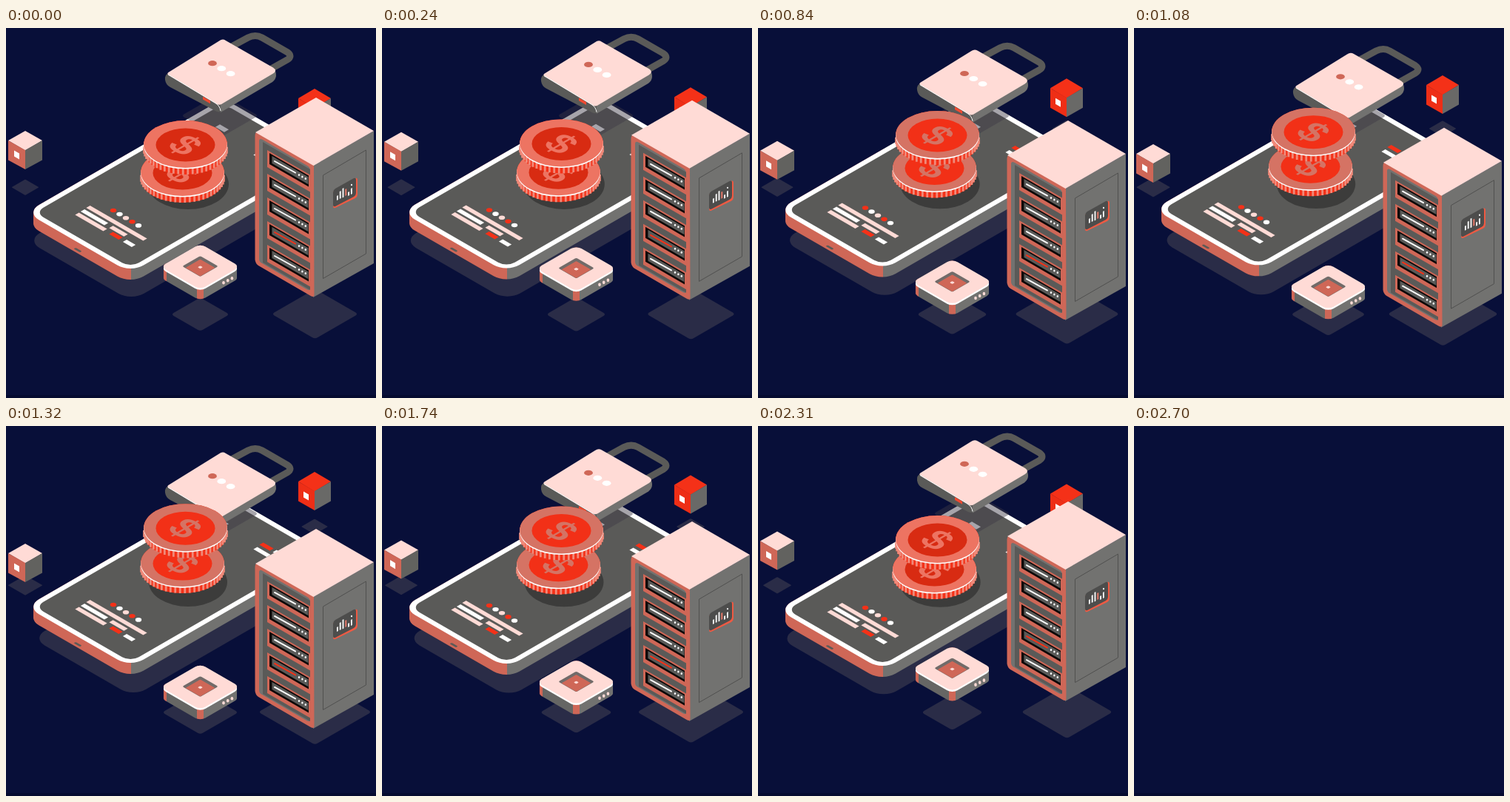
An HTML page with a canvas for the animation above (2.73 s loop, 500x500 px).

```html
<!DOCTYPE html>
<html lang="en">
<head>
<meta charset="utf-8">
<title>Isometric devices</title>
<style>
html, body { margin: 0; width: 100%; height: 100%; overflow: hidden; background: #080f39; }
canvas { display: block; }
</style>
</head>
<body>
<canvas id="stage" width="500" height="500"></canvas>
<script>
const ctx = document.getElementById('stage').getContext('2d');
const LOOP = 2730, STEP = 30;
const BG = '#080f39', PINK = '#ffdbd6', WHITE = '#ffffff', CORAL = '#cf6757', RED = '#f43118',
      DARK = '#5a5a58', GREY = '#727270', SHADOW = '#2a2c47';
const COS = Math.sqrt(3) / 2, SLOPE = 1 / Math.sqrt(3);

// Rounded rectangle lying on the isometric ground plane, a runs down-right, b runs up-right.
function isoRect(cx, cy, a, b, r) {
  const flat = new Path2D();
  flat.roundRect(-a / 2, -b / 2, a, b, r);
  const path = new Path2D();
  path.addPath(flat, new DOMMatrix([COS, 0.5, COS, -0.5, cx, cy]));
  return path;
}

function fill(path, color) {
  ctx.fillStyle = color;
  ctx.fill(path);
}

function poly(color, ...pts) {
  ctx.beginPath();
  for (let i = 0; i < pts.length; i += 2) ctx.lineTo(pts[i], pts[i + 1]);
  ctx.closePath();
  ctx.fillStyle = color;
  ctx.fill();
}

// Vertical wall panel: its top edge runs with the given slope.
function panel(color, x, y, w, h, slope = SLOPE) {
  poly(color, x, y, x + w, y + w * slope, x + w, y + w * slope + h, x, y + h);
}

function ellipse(color, x, y, rx, ry) {
  ctx.beginPath();
  ctx.ellipse(x, y, rx, ry, 0, 0, Math.PI * 2);
  ctx.fillStyle = color;
  ctx.fill();
}

// Square ground shadow with the given half width.
function diamond(x, y, hw, r = 4) {
  const side = (hw + 0.507 * r) / COS;
  fill(isoRect(x, y, side, side, r), SHADOW);
}

function shifted(dx, dy, draw) {
  ctx.save();
  ctx.translate(dx, dy);
  draw();
  ctx.restore();
}

// Sides of a slab; bands lists pairs of colour and right-hand limit.
function extrude(path, depth, bands) {
  const wall = ctx.createLinearGradient(0, 0, 500, 0);
  let from = 0;
  for (const [color, to] of bands) {
    wall.addColorStop(from / 500, color);
    wall.addColorStop(to / 500, color);
    from = to;
  }
  for (let y = depth; y >= 0; y--) shifted(0, y, () => fill(path, wall));
}

const phoneFace = isoRect(231, 213, 163, 308, 20);
const phoneScreen = isoRect(231, 213, 149, 294, 13);
const routerFace = isoRect(262.5, 322.5, 62, 62, 8);

// Bar printed along the phone's short side.
function bar(color, x, y, w, t = 6) {
  const dx = t * COS / 2, dy = t / 4;
  poly(color, x + dx, y - dy, x + w + dx, y + w * SLOPE - dy,
       x + w - dx, y + w * SLOPE + dy, x - dx, y + dy);
}

function phoneShadow(k) {
  const s = 1 - 0.032 * k;
  ctx.save();
  ctx.translate(257, 270);
  ctx.scale(s, s);
  ctx.translate(-256, -232);
  fill(phoneFace, SHADOW);
  ctx.restore();
}

function phone() {
  extrude(phoneFace, 15, [[CORAL, 169], [GREY, 500]]);
  fill(phoneFace, WHITE);
  fill(phoneScreen, DARK);
  fill(isoRect(97, 300, 10, 3, 2), DARK);

  [RED, WHITE, PINK, RED, WHITE].forEach((c, i) =>
    ellipse(c, 145 + 8.5 * i, 246.5 + 5.1 * i, 4.2, 2.8));
  bar(PINK, 111, 241.5, 77);
  bar(WHITE, 103.5, 246.5, 32);
  bar(PINK, 142, 268.7, 20);
  bar(PINK, 96, 251, 38);
  bar(RED, 142, 277, 13);
  bar(WHITE, 160.5, 287.5, 12);

  bar(WHITE, 286, 132, 12, 7);
  bar(RED, 345, 164, 14);
  bar(WHITE, 337, 170, 18);
  bar(WHITE, 363, 174, 14);
}

function coin(x, y, rim, core) {
  const rx = 56.3, ry = 32, depth = 9, ridges = 27;
  for (let d = depth; d >= 0; d--) ellipse(RED, x, y + d, rx, ry);
  ctx.strokeStyle = '#f08a7a';
  ctx.lineWidth = 2.8;
  ctx.beginPath();
  for (let i = 1; i < ridges; i++) {
    const a = Math.PI * i / ridges;
    const ex = x + rx * Math.cos(a), ey = y + ry * Math.sin(a);
    ctx.moveTo(ex, ey);
    ctx.lineTo(ex, ey + depth);
  }
  ctx.stroke();
  ellipse(WHITE, x, y + 1.6, rx, ry);
  ellipse(rim, x, y, rx, ry);
  ellipse(core, x, y + 1, 40, 22.5);

  ctx.save();
  ctx.transform(COS, 0.5, -COS, 0.5, x, y + 1);
  ctx.font = 'bold 51px "Liberation Sans", Arial, sans-serif';
  ctx.textAlign = 'center';
  ctx.fillStyle = rim;
  ctx.fillText('$', 0, 17.5);
  ctx.restore();
}

function coins(k, t) {
  const bright = t > 560 && t < 2100;
  const rim = bright ? '#d57364' : '#ed7462';
  const core = bright ? '#f23017' : '#d82b12';
  coin(238.5, 195 - 10 * k, rim, core);
  coin(242.5, 157 - 20 * k, rim, core);
}

function lock() {
  ctx.strokeStyle = DARK;
  ctx.lineWidth = 9;
  ctx.stroke(new Path2D('M303 26 L327 13 Q337 8 346 13 L380 32.5 Q388 38 380 43 L355 57'));
  fill(new Path2D('M221 60 Q214 63 215 70 Q216 77 222 80 L283 112 Q289 115 292 112 V100 Z'), DARK);
  fill(new Path2D('M290 102 L362 56 Q365 58 365 64 Q365 69 360 73 L290 114 Z'), GREY);
  fill(new Path2D('M219 63 Q217 61 221 59 L288 17.5 Q292.5 14 297 17 L361 53.5 Q367 57.5 361 61.5 L291 103 Q287 105 283 101.5 Z'), PINK);
  ctx.strokeStyle = WHITE;
  ctx.lineWidth = 1;
  ctx.stroke(new Path2D('M219 63 L283 101.5 Q289 105 290 112'));
  panel('#ef4a31', 266, 92.5, 10, 4);
  [CORAL, WHITE, WHITE].forEach((c, i) =>
    ellipse(c, 279 + 12.3 * i, 47.7 + 7 * i, 5.9, 3.6));
}

function drawer(y, line) {
  panel(CORAL, 353, y, 58.5, 23);
  panel('#0b0808', 356, y + 4, 53, 15);
  panel(DARK, 359.5, y + 8, 49, 10);
  ctx.strokeStyle = line;
  ctx.lineWidth = 2;
  ctx.lineCap = 'round';
  ctx.stroke(new Path2D(`M363 ${y + 15} l28 15.5`));
  ctx.lineCap = 'butt';
  for (let i = 0; i < 3; i++) ellipse(WHITE, 396 + 4.4 * i, y + 33.5 + 2.5 * i, 1.2, 1.5);
}

function server() {
  poly(GREY, 415, 186, 497, 139, 497, 318, 415, 364);
  fill(new Path2D('M416 185 L341 141 Q336.5 140 336.5 146 V313 Q337 318 341 321 L410 361 Q416 365 416.5 361 Z'), CORAL);
  poly(PINK, 419, 94, 497, 139, 415.5, 186, 337, 141);
  fill(new Path2D('M342 153 Q342 148 347 151 L407 186 Q411 188 411 193 V351 Q411 356 406 353 L346 318 Q342 316 342 312 Z'), GREY);
  panel(DARK, 347, 154, 64, 163);
  for (let i = 0; i < 5; i++) drawer(165 + 32 * i, i === 3 ? RED : WHITE);

  ctx.strokeStyle = '#50504f';
  ctx.lineWidth = 1;
  ctx.stroke(new Path2D('M428.5 199 L486.5 165 V305 L428.5 338.5 Z'));
  fill(new Path2D('M444 219 L472 203 Q475 202 475 205 V225 Q475 228 472 230 L445 243 Q442 244 442 241 V222 Z'), '#ee5a43');
  fill(new Path2D('M445 217 L470 203 Q473 202 473 205 V223 Q473 226 470 228 L445 241 Q442 242 442 239 V222 Q442 219 445 217 Z'), '#4d4d4c');
  [[6, 227], [10, 221], [12.5, 217], [9, 218], [5, 222], [8, 217]].forEach(([h, y], i) =>
    panel(i === 3 ? '#f27c6c' : WHITE, 447 + 3.8 * i, y, 1.8, h, -SLOPE));
  ellipse(WHITE, 467, 212, 1, 1.2);
}

function router() {
  extrude(routerFace, 15, [[CORAL, 217], ['#666664', 258], [CORAL, 267], [GREY, 500]]);
  shifted(0, 2.5, () => fill(routerFace, WHITE));
  fill(routerFace, PINK);
  fill(isoRect(262.5, 322, 28, 28, 2), '#716b69');
  fill(isoRect(262.5, 324, 23, 23, 1), CORAL);
  fill(isoRect(262.5, 323.2, 4, 4, 1), PINK);
  for (let i = 0; i < 3; i++) ellipse(PINK, 294 + 5.7 * i, 344.3 - 3 * i, 1.8, 2.3);
}

// Cube hung from its top corner.
function cube(x, y, w, top, left, right) {
  poly(top, x, y, x + w, y + 13, x, y + 26.5, x - w, y + 13);
  poly(left, x - w, y + 13, x, y + 26, x, y + 52, x - w, y + 39.5);
  poly(right, x, y + 26, x + w, y + 13, x + w, y + 39.5, x, y + 52);
  panel(WHITE, x - 15, y + 26.5, 7, 8);
}

// Rise and return between 0 and 1.
const smooth = p => p * p * (3 - 2 * p);
function swing(t, mid, end) {
  const p = t < mid ? t / mid : (end - t) / (end - mid);
  return smooth(Math.max(0, p));
}

function draw(t) {
  ctx.fillStyle = BG;
  ctx.fillRect(0, 0, 500, 500);
  ctx.fillStyle = '#050b2f';
  ctx.fillRect(0, 496, 500, 4);
  if (t >= 2700) return;

  const k = swing(t, 1335, 2670);
  diamond(417, 136, 23 - 5.5 * k, 1);
  cube(417, 82 - 20 * k, 22, RED, '#ee2e16', '#696967');

  phoneShadow(k);
  shifted(0, -5 * k, phone);
  fill(isoRect(289, 118.5, 60, 60, 4), 'rgba(60,57,70,.45)');
  ellipse('#3c3c3b', 246, 211, 55 - 2 * k, 34 - k);

  shifted(0, 20 * k, lock);
  coins(swing(t, 1400, 2680), t);

  diamond(417.5, 386.5, 56.5 + 18 * k);
  shifted(0, 45 * k, server);
  diamond(262.5, 387, 37.5 + 12 * k);
  shifted(0, 30 * k, router);
  diamond(26, 215.3, 18 + 5 * k, 1);
  cube(26, 139 + 20 * k, 23, PINK, CORAL, '#62625f');
}

function tick(now) {
  draw(Math.floor((now % LOOP) / STEP) * STEP);
  requestAnimationFrame(tick);
}
draw(0);
requestAnimationFrame(tick);
</script>
</body>
</html>
```
